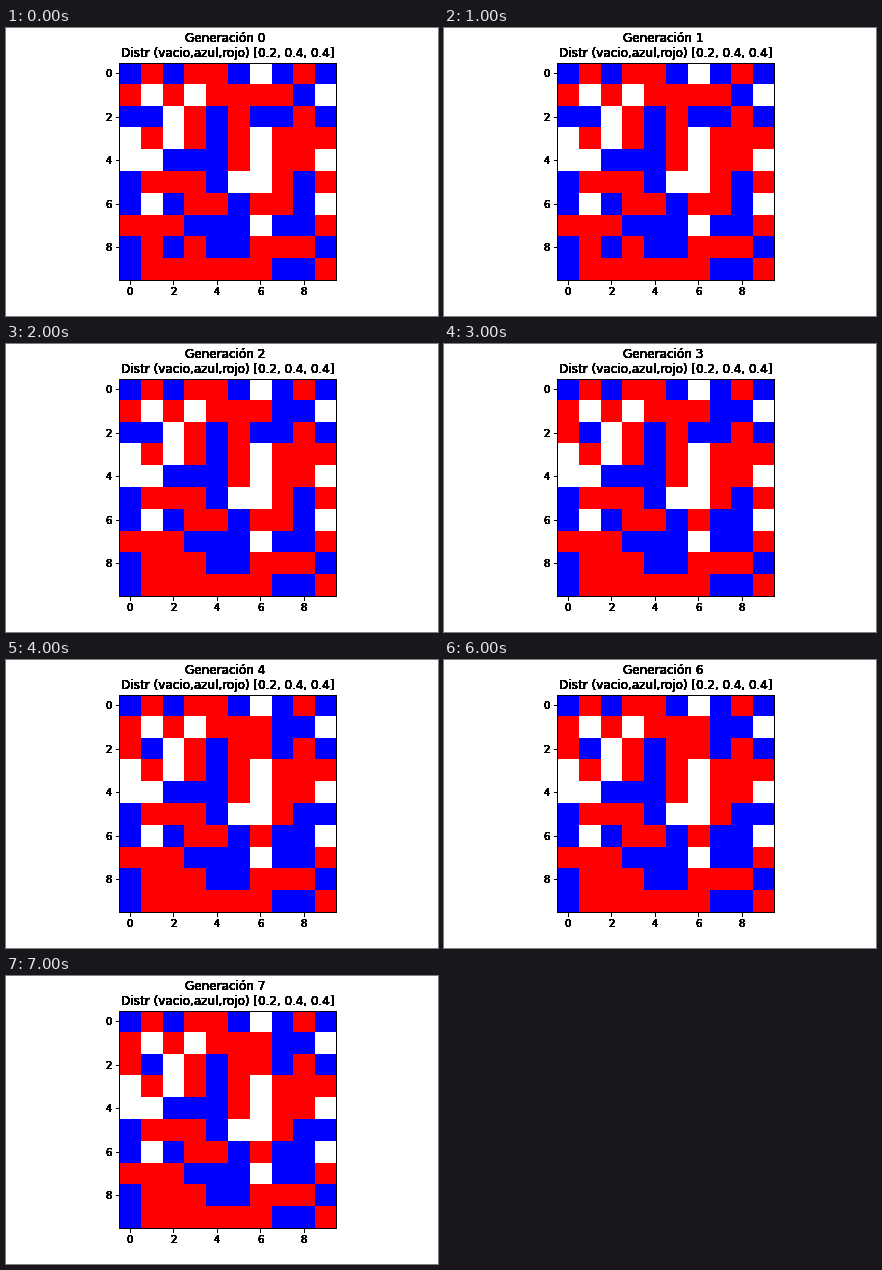
These frames come from a looping animation (432 px wide and 288 px high, 8000 ms). A matplotlib script:

```python
import numpy as np
import matplotlib.pyplot as plt
from matplotlib.animation import FuncAnimation

GENERATIONS = 8
COLORS = {"W": (255, 255, 255), "B": (0, 0, 255), "R": (255, 0, 0)}

START = """
BRBRRBWBRB
RWRWRRRRBW
BBWRBRBBRB
WRWRBRWRRR
WWBBBRWRRW
BRRRBWWRBR
BWBRRBRRBW
RRRBBBWBBR
BRBRBBRRRB
BRRRRRRBBR
""".split()

# generation: pair of cells (row, column) that trade places
SWAPS = {
    2: ((1, 7), (8, 2)),
    3: ((2, 0), (6, 7)),
    4: ((2, 6), (5, 9)),
}


def grid_at(generation):
    cells = np.array([list(row) for row in START])
    for step, (a, b) in SWAPS.items():
        if step <= generation:
            cells[a], cells[b] = cells[b], cells[a]
    return np.array([[COLORS[c] for c in row] for row in cells], dtype=np.uint8)


def harden(artist, passes=20):
    """Overprint an artist so its soft edges become solid."""
    draw = artist.draw

    def repeat(renderer):
        for _ in range(passes):
            draw(renderer)

    artist.draw = repeat


plt.rcParams.update({"font.family": "DejaVu Sans", "font.size": 10})
fig, ax = plt.subplots(figsize=(6, 4), dpi=72, facecolor="white")
fig.subplots_adjust(left=0.125, right=0.9, bottom=0.125, top=0.88)

image = ax.imshow(grid_at(0), interpolation="nearest")
ax.set_xticks(range(0, 10, 2))
ax.set_yticks(range(0, 10, 2))

title = ax.set_title("Distr (vacio,azul,rojo) [0.2, 0.4, 0.4]", fontsize=12)
counter = fig.text(179.35 / 432, 274 / 288, "", fontsize=12,
                   ha="left", va="baseline")

for artist in (title, counter, *ax.spines.values()):
    harden(artist)
for tick in ax.xaxis.get_major_ticks() + ax.yaxis.get_major_ticks():
    harden(tick.label1)
    harden(tick.tick1line)


def update(generation):
    image.set_data(grid_at(generation))
    counter.set_text(f"Generación {generation}")
    return image, counter


anim = FuncAnimation(fig, update, frames=GENERATIONS, interval=1000,
                     init_func=lambda: update(0), repeat=True, repeat_delay=0)
plt.show()
```
